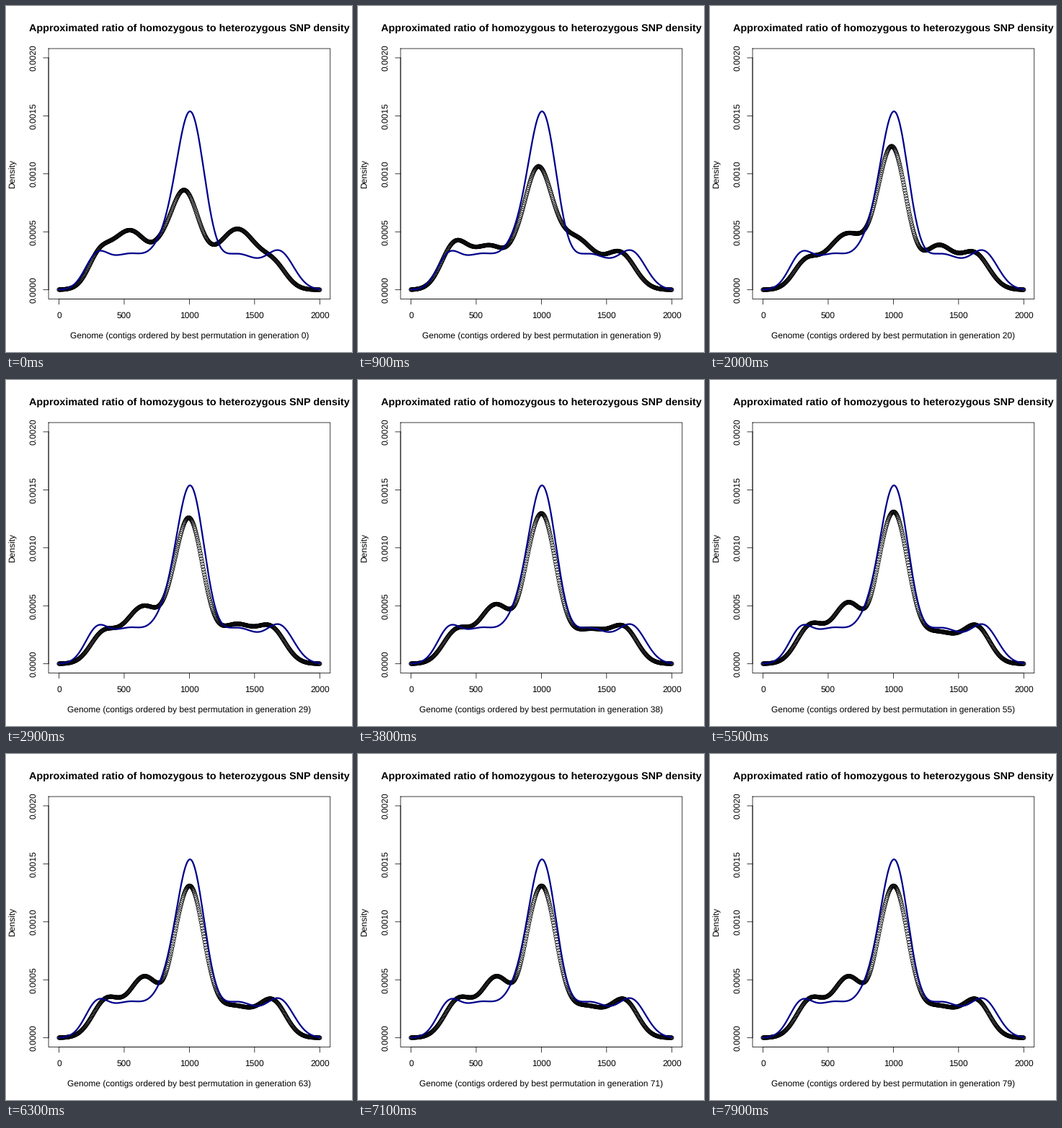
Write a matplotlib script that moves like this. It is 480 px wide and 480 px high and loops after 8000 ms.

```python
import numpy as np
import matplotlib.pyplot as plt
from matplotlib.animation import FuncAnimation
from matplotlib.collections import EllipseCollection

plt.rcParams.update({
    "font.family": "Liberation Sans",
    "font.size": 12,
    "text.hinting": "none",
})

SIZE, FRAMES, INTERVAL = 480, 80, 100
LEFT, RIGHT, TOP, BOTTOM = 59.04, 449.76, 59.04, 406.56
X0, X1 = 73.51, 435.29      # genome 0 and 2000
Y0, Y1 = 393.69, 71.91      # density 0 and 0.002
LINE = 14.4                 # height of one margin line
THIN, THICK = 0.75, 2.25
GRID = np.linspace(X0, X1, 512)


def density(hills):
    """Sum of bell-shaped hills (centre, height, width), in stage pixels."""
    center, height, width = np.transpose(hills)[:, :, None]
    return Y0 - (height * np.exp(-((GRID - center) / width) ** 2 / 2)).sum(0)


EXPECTED = [(125, 40, 16), (170, 48, 27), (222, 50, 20),
            (256.5, 231, 19.3), (322, 49, 30), (381, 47, 19)]

# The same six hills wander and settle as the generations pass.
STAGES = {
    0: [(128, 32, 15), (172, 82, 28), (214, 11, 12),
        (247, 133, 21), (321, 84, 28.5), (373, 26, 17)],
    9: [(133, 56, 18), (183, 60, 27), (218, 6, 10),
        (249, 156, 20), (302, 70, 28), (365, 47, 20)],
    20: [(132, 33, 17), (190, 77, 29), (220, 0, 10),
         (253, 191, 20), (317, 59, 21), (367, 49, 20)],
    38: [(136, 43, 18.5), (191, 81, 24), (234, 12, 10),
         (255, 201, 20), (322, 47, 30), (371, 39, 18)],
    55: [(139, 51, 19), (192, 83, 22), (234, 12, 10),
         (255, 204, 20), (318, 43, 29), (371, 45, 18)],
}


def hills_at(generation):
    times = list(STAGES)
    i = min(np.searchsorted(times, generation, "right"), len(times) - 1)
    before, after = times[i - 1], times[i]
    t = min((generation - before) / (after - before), 1)
    return (1 - t) * np.array(STAGES[before]) + t * np.array(STAGES[after])


def points_at(generation):
    return np.column_stack([GRID, density(hills_at(generation))])


fig = plt.figure(figsize=(SIZE / 72, SIZE / 72), dpi=72, facecolor="white")
ax = fig.add_axes([0, 0, 1, 1])
ax.set(xlim=(0, SIZE), ylim=(SIZE, 0))
ax.axis("off")


def stroke(xs, ys, color="black", lw=THIN, **style):
    ax.plot(xs, ys, color=color, lw=lw, snap=False, **style)


def label(x, y, text, **style):
    return ax.text(x, y, text, ha="center", va="baseline",
                   rotation_mode="anchor", **style)


diameter = np.full(len(GRID), 5.4)
circles = EllipseCollection(
    diameter, diameter, np.zeros(len(GRID)), units="xy",
    offsets=points_at(0), offset_transform=ax.transData,
    facecolors="none", edgecolors="black", linewidths=THIN, zorder=2)
ax.add_collection(circles, autolim=False)
stroke(GRID, density(EXPECTED), color="#00008b", lw=THICK, zorder=3)

# Frame and axes
stroke([LEFT, RIGHT, RIGHT, LEFT, LEFT], [TOP, TOP, BOTTOM, BOTTOM, TOP])
stroke([X0, X1], [BOTTOM, BOTTOM])
stroke([LEFT, LEFT], [Y0, Y1])
for i, (x, y) in enumerate(zip(np.linspace(X0, X1, 5),
                               np.linspace(Y0, Y1, 5))):
    stroke([x, x], [BOTTOM, BOTTOM + LINE / 2])
    stroke([LEFT, LEFT - LINE / 2], [y, y])
    label(x, BOTTOM + 1.8 * LINE, str(500 * i))
    label(LEFT - 1.2 * LINE, y, f"{0.0005 * i:.4f}", rotation=90)

center, middle = (LEFT + RIGHT) / 2, (TOP + BOTTOM) / 2
label(center, 34.8,
      "Approximated ratio of homozygous to heterozygous SNP density",
      size=14.4, weight="bold")
label(LEFT - 3.2 * LINE, middle, "Density", rotation=90)
caption = label(center, BOTTOM + 3.8 * LINE, "")


def update(generation):
    circles.set_offsets(points_at(generation))
    caption.set_text("Genome (contigs ordered by best permutation "
                     f"in generation {generation})")
    return circles, caption


anim = FuncAnimation(fig, update, frames=FRAMES, interval=INTERVAL,
                     repeat=True, repeat_delay=0, blit=False)
plt.show()
```
